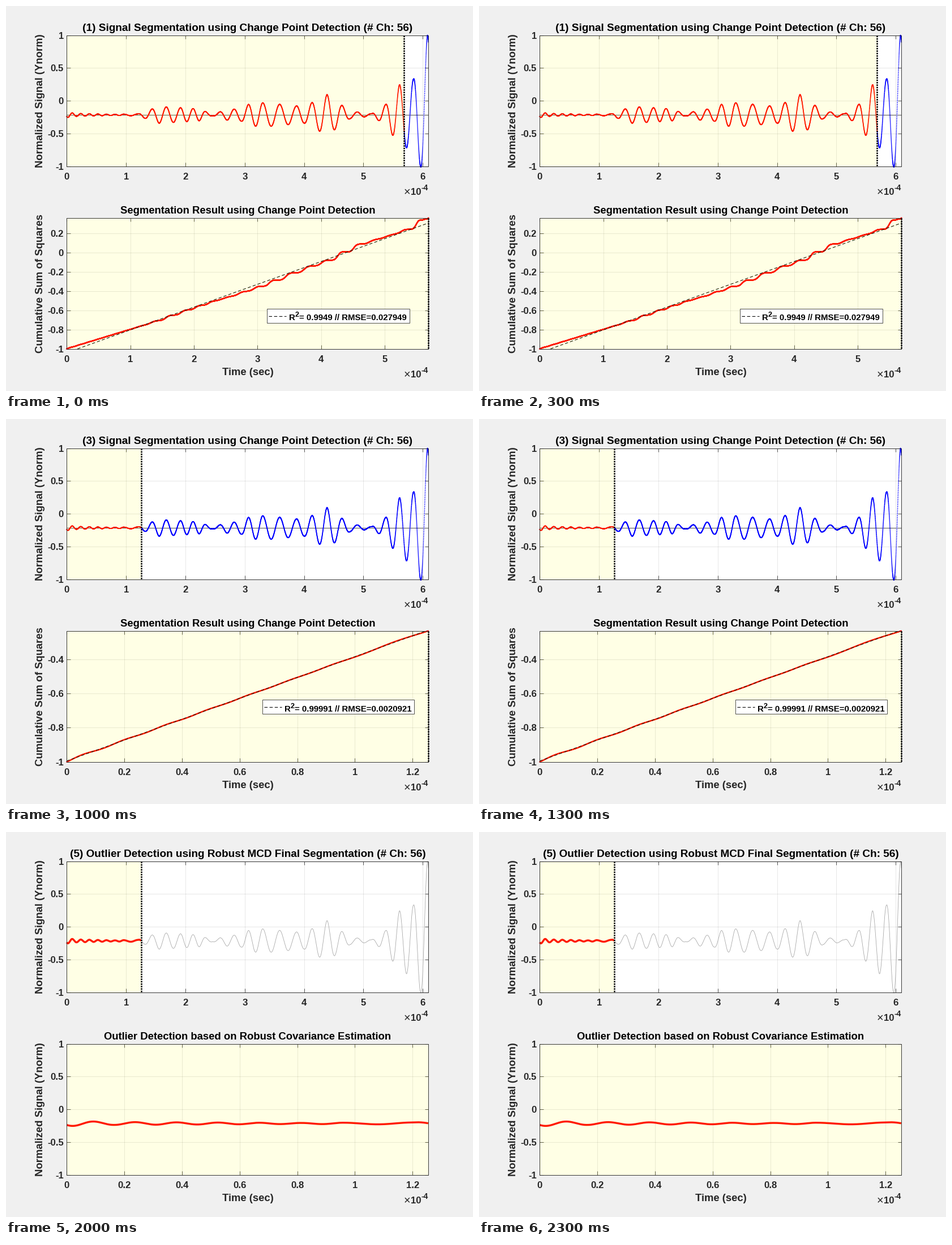
Recreate the animation shown at these times as a matplotlib script. Size 825 px wide and 679 px high, loop 2500 ms.

```python
import math
import numpy as np
import matplotlib.pyplot as plt
from matplotlib.animation import FuncAnimation
from matplotlib.patches import Rectangle

W, H, DPI = 825, 679, 64
PX = 72 / DPI  # points per pixel
INK = "#262626"
LEFT, RIGHT = 107.3, 746.3
UPPER, LOWER = (51.7, 282.7), (373.7, 604.7)
T_END = 6.0957
REST = -0.215

plt.rcParams["font.family"] = "Liberation Sans"
fig = plt.figure(figsize=(W / DPI, H / DPI), dpi=DPI, facecolor="#f0f0f0")
ax = fig.add_axes([0, 0, 1, 1])

# Key points of the oscillation: (time in 1e-4 s, cycle) and (cycle, amplitude)
CYCLES = [(-.05, -9), (.957, -2), (1.437, 0), (1.919, 2), (2.339, 4),
          (3.303, 8), (3.875, 10), (4.9, 14), (6.079, 19), (6.32, 20)]
ENVELOPE = [(-9, .045), (-7.5, .022), (-3, .008), (-1, .015), (.5, .127),
            (3.5, .09), (4.5, .012), (5.5, .08), (6.5, .095), (7, .16),
            (8, .185), (10.5, .125), (12, .31), (13.5, .058), (15, .016),
            (16, .154), (17, .46), (18, .545), (18.5, .785), (19, 1.215),
            (20, 1.215)]


def wave(t):
    """Amplitude-modulated cosine around the resting level."""
    cycle = np.interp(t, *zip(*CYCLES))
    return REST + np.interp(cycle, *zip(*ENVELOPE)) * np.cos(2 * np.pi * cycle)


time = np.arange(0, T_END, 0.001)
signal = wave(time)
energy = np.cumsum(signal ** 2)

# cut time, last energy value, legend top, R2, RMSE
STEPS = [
    (5.687, -1 + 1.362, 534, "0.9949", "0.027949"),
    (3.119, -1 + .945, 534, "0.99898", "0.0088862"),
    (1.255, -1 + .767, 495, "0.99991", "0.0020921"),
    (.11705, -1 + .197, 495, "0.9845", "0.0070592"),
]
FINAL_CUT = STEPS[2][0]


def text(x, y, s, size, color=INK, weight="bold", ha="left", **kw):
    ax.text(x, y, s, fontsize=size * PX, color=color, weight=weight,
            ha=ha, va="baseline", zorder=9, **kw)


def line(x, y, color=INK, width=1.0, z=3, **kw):
    ax.plot(x, y, color=color, lw=width * PX, zorder=z,
            dash_capstyle="butt", solid_capstyle="butt", **kw)


def dots(x, y, color, size):
    ax.scatter(x, y, s=np.full(len(x), (size * PX) ** 2), c=color,
               linewidths=0, zorder=3)


def rect(x0, y0, x1, y1, z, **kw):
    ax.add_patch(Rectangle((x0, y0), x1 - x0, y1 - y0, zorder=z, **kw))


def divider(x, y0, y1):
    line([x, x], [y0, y1], "black", 2.6, z=7, ls=(0, (1, .65)))


def dashed(x, y, z=4):
    line(x, y, "black", 1.1, z=z, ls=(0, (5, 3.3)))


class Panel:
    """Plot box that maps data to stage pixels."""

    def __init__(self, span, t_max, lo, hi):
        self.y0, self.y1 = span
        self.t_max, self.lo, self.hi = t_max, lo, hi

    def x(self, t):
        return LEFT + np.asarray(t) * (RIGHT - LEFT) / self.t_max

    def y(self, v):
        return self.y1 - (np.asarray(v) - self.lo) * (self.y1 - self.y0) / (self.hi - self.lo)

    def shade(self, x1):
        rect(LEFT, self.y0, x1, self.y1, 5, fc="yellow", alpha=.1, lw=0)

    def frame(self, dy):
        y0, y1 = self.y0, self.y1
        rect(LEFT, y0, RIGHT, y1, 0, fc="white", lw=0)
        power = math.floor(math.log10(self.t_max))
        unit = 10.0 ** power
        dx = 1 if self.t_max > 2 * unit else .2
        for t in np.arange(0, self.t_max / unit + 1e-9, dx):
            x = self.x(t * unit)
            line([x, x], [y0, y1], z=1, alpha=.11)
            line([x, x], [y1 - 6.4, y1], width=.8)
            line([x, x], [y0, y0 + 6.4], width=.8)
            text(x, y1 + 23.3, f"{t:.3g}", 16.7, ha="center")
        for v in np.arange(self.lo, self.hi + 1e-9, dy):
            y = self.y(v)
            line([LEFT, RIGHT], [y, y], z=1, alpha=.11)
            line([LEFT, LEFT + 6.4], [y, y], width=.8)
            line([RIGHT - 6.4, RIGHT], [y, y], width=.8)
            text(101.8, y + 6, f"{round(v, 3) + 0.0:g}", 16.7, ha="right")
        rect(LEFT, y0, RIGHT, y1, 6, fill=False, ec=INK, lw=.9 * PX)
        base = y1 + 50.5
        text(703, base + 1, "×", 20, weight="normal")
        text(714.8, base, "10", 16.7)
        text(733.6, base - 8.5, f"{power - 4}", 14)

    def titles(self, title, title_size, label, label_x=65):
        text(427, self.y0 - 7.6, title, title_size, "black", ha="center")
        text(label_x, (self.y0 + self.y1) / 2, label, 18.5, ha="center",
             rotation=90, rotation_mode="anchor")


def legend(top, r2, rmse):
    width = 252 + 8.4 * (len(r2 + rmse) - 14)
    x0 = 587 - width / 2
    rect(x0, top, x0 + width, top + 25, 7, fc="white", ec=INK, lw=.8 * PX)
    dashed([x0 + 3, x0 + 34], [top + 12.7] * 2, z=8)
    base = top + 20.5
    text(x0 + 39, base, "R", 15, "black")
    text(x0 + 50, base - 6, "2", 12.6, "black")
    text(x0 + 57.2, base, f"= {r2} // RMSE={rmse}", 15, "black")


def draw_signal(number, cut, final):
    p = Panel(UPPER, T_END, -1, 1)
    p.frame(.5)
    name = ("Outlier Detection using Robust MCD Final Segmentation" if final
            else "Signal Segmentation using Change Point Detection")
    p.titles(f"({number}) {name} (# Ch: 56)", 19.05, "Normalized Signal (Ynorm)")
    x, y = p.x(time), p.y(signal)
    head = time <= cut
    if final:
        line(x[~head], y[~head], "#a4a4a4", .8)
        line(x[head], y[head], "red", 3.4)
    else:
        line([LEFT, RIGHT], [p.y(REST)] * 2, width=.8, z=2)
        dots(x[~head], y[~head], "blue", 1.75)
        dots(x[head], y[head], "red", 1.75)
    p.shade(p.x(cut))
    divider(p.x(cut), p.y0, p.y1)


def draw_energy(cut, top, legend_top, r2, rmse):
    p = Panel(LOWER, cut, -1, top)
    fine = top + 1 < .3
    p.frame(.05 if fine else .2)
    p.titles("Segmentation Result using Change Point Detection", 18.45,
             "Cumulative Sum of Squares", 56 if fine else 65)
    t = time[time <= cut]
    e = energy[:len(t)] - energy[0]
    curve = -1 + (top + 1) * e / e[-1]
    dots(p.x(t), p.y(curve), "red", 2.2)
    fit = np.polyval(np.polyfit(t, curve, 1), t)
    inside = (fit >= -1) & (fit <= top)
    dashed(p.x(t[inside][[0, -1]]), p.y(fit[inside][[0, -1]]))
    p.shade(RIGHT)
    divider(RIGHT, p.y0, p.y1)
    legend(legend_top, r2, rmse)


def draw_outliers(cut):
    p = Panel(LOWER, cut, -1, 1)
    p.frame(.5)
    p.titles("Outlier Detection based on Robust Covariance Estimation", 18.45,
             "Normalized Signal (Ynorm)")
    head = time <= cut
    line(p.x(time[head]), p.y(signal[head]), "red", 3.4)
    p.shade(RIGHT)


def draw(i):
    ax.cla()
    ax.axis("off")
    final = i == len(STEPS)
    draw_signal(i + 1, FINAL_CUT if final else STEPS[i][0], final)
    if final:
        draw_outliers(FINAL_CUT)
    else:
        draw_energy(*STEPS[i])
    text(427, 651, "Time (sec)", 18.5, ha="center")
    ax.set_xlim(0, W)
    ax.set_ylim(H, 0)
    return []


anim = FuncAnimation(fig, draw, frames=len(STEPS) + 1, interval=500,
                     repeat=True, repeat_delay=0)
plt.show()
```
